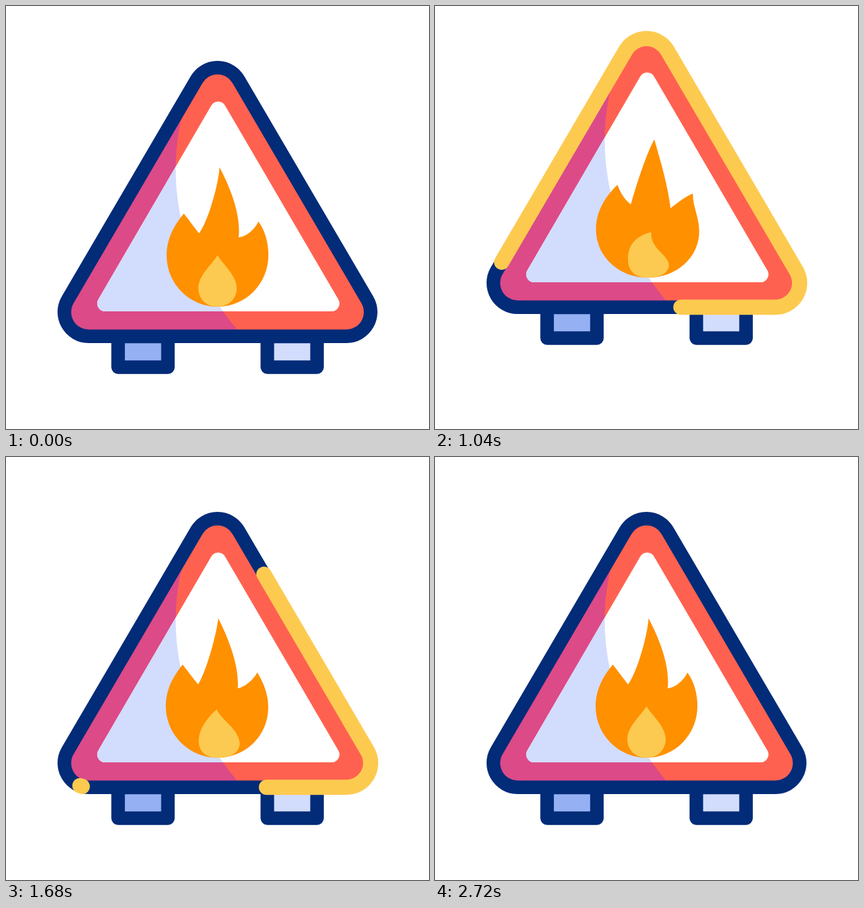
Animation, 640 px wide and 640 px high, one loop 2800 ms. Source, as an HTML page:

```html
<!DOCTYPE html>
<html lang="en">
<head>
<meta charset="utf-8">
<title>Fire warning sign</title>
<style>
  html, body { margin: 0; width: 100%; height: 100%; overflow: hidden; background: #fff; }
  svg { display: block; width: 100%; height: 100%; }
  .leg { stroke: #022b78; stroke-width: 20.5; stroke-linejoin: round; }
  .border { fill: none; stroke: #022b78; stroke-width: 20.6; }
  .glow { fill: none; stroke: #fdca50; stroke-width: 23; stroke-linecap: round; }
</style>
</head>
<body>
<svg viewBox="0 0 640 640">
  <defs>
    <clipPath id="frameClip"><path class="frame"/></clipPath>
    <clipPath id="panelClip"><path class="panel"/></clipPath>
  </defs>
  <g id="sign">
    <path class="leg" fill="#95b0f3" d="M169.6 500H245V546.6H169.6Z"/>
    <path class="leg" fill="#d2dcfd" d="M395.4 500H470.6V546.6H395.4Z"/>
    <path class="frame" fill="#ff6150"/>
    <path class="shade" fill="#dc4a87" clip-path="url(#frameClip)"/>
    <path class="panel" fill="#fff"/>
    <path class="shade" fill="#d2dcfd" clip-path="url(#panelClip)"/>
    <path class="frame border"/>
    <path class="frame glow"/>
    <path class="frame glow"/>
    <path class="frame glow"/>
    <path id="flame" fill="#ff9000"/>
    <path id="core" fill="#fcca50"/>
  </g>
</svg>
<script>
const LOOP = 2800, STEP = 40;
const $$ = s => [...document.querySelectorAll(s)];
const [sign, flame, core] = ['#sign', '#flame', '#core'].map(s => $$(s)[0]);
const glows = $$('.glow');

// Rounded triangle from its corner centres, starting on the bottom edge.
function triangle(points, r) {
  const edges = points.map((p, i) => {
    const q = points[(i + 1) % 3];
    const dx = q[0] - p[0], dy = q[1] - p[1], k = r / Math.hypot(dx, dy);
    return [p, q].map(c => `${c[0] - dy * k} ${c[1] + dx * k}`);
  });
  return edges.map(([a, b], i) =>
    `${i ? '' : 'M' + a}L${b}A${r} ${r} 0 0 0 ${edges[(i + 1) % 3][0]}`).join('') + 'Z';
}

// Smooth monotone curve through [time, value] keys.
function track(...keys) {
  const slope = keys.slice(1).map(([t, v], i) => (v - keys[i][1]) / (t - keys[i][0]));
  const tangent = keys.map((_, i) => {
    const a = slope[i - 1], b = slope[i];
    return a * b > 0 ? 2 * a * b / (a + b) : 0;
  });
  return t => {
    if (t <= keys[0][0]) return keys[0][1];
    const i = keys.findIndex(k => t < k[0]) - 1;
    if (i < 0) return keys[keys.length - 1][1];
    const [t0, v0] = keys[i], [t1, v1] = keys[i + 1];
    const h = t1 - t0, u = (t - t0) / h, w = 1 - u;
    return v0 * w * w * (1 + 2 * u) + v1 * u * u * (3 - 2 * u)
      + h * u * w * (tangent[i] * w - tangent[i + 1] * u);
  };
}

// Blend two path strings that share a structure.
function blend(a, b, k) {
  const to = b.match(/[\d.]+/g);
  let i = 0;
  return a.replace(/[\d.]+/g, n => (+n + (to[i++] - n) * k).toFixed(2));
}

const upright = 'M323 244C322 268 306 326 292 344C284 334 277 324 269 314C256 330 243 350 243 377C243 420 277 455 320 455C363 455 397 420 397 377C397 358 392 340 382 326C376 339 363 349 352 350C356 315 338 272 323 244Z';
const left = 'M304 244C288 270 279 305 279 335C279 335 262 326 251 314C242 332 231 345 231 374C231 417 270 455 320 455C365 455 395 428 395 394C395 364 368 350 363 326C353 329 345 338 339 351C327 315 315 278 304 244Z'.replace('279 335C279 335', '279 345C268 337');
const right = 'M339 247C317 270 303 306 300 344C289 340 283 328 282 315C258 334 244 360 244 385C244 425 278 455 323 455C368 455 402 428 402 391C402 366 388 356 397 329C380 327 367 338 360 350C349 315 343 280 339 247Z';

const drop = 'M320 377C327 390 349 407 349 427C349 444 336 455 320 455C304 455 291 444 291 427C291 407 313 390 320 377Z';
const coreLeft = 'M306 383C324 387 354 405 355 430C354 446 340 455 320 455C303 455 293 446 293 432C293 420 302 403 306 383Z';
const corePoses = [
  drop,
  'M319 378C328 390 349 407 349 427C347 446 334 455 320 455C304 455 293 444 293 428C293 410 309 392 319 378Z',
  'M346 385C355 396 358 408 357 424C355 443 345 455 322 455C305 455 294 445 294 429C294 411 327 411 346 385Z',
  'M327 386C326 413 354 420 354 437C352 450 338 455 322 455C304 455 292 446 292 427C292 404 305 392 327 386Z',
  coreLeft,
  'M333 381C329 411 352 421 352 438C351 450 340 455 322 455C302 455 290 446 290 428C290 403 308 384 333 381Z',
  coreLeft,
  drop
];

const lift = track([200, 0], [725, -44], [1035, -44], [1560, 0]);
const lean = track([120, 0], [560, -1], [880, 1], [1400, -1], [2000, 1], [2380, -1], [2720, 0]);
const corePhase = track([120, 0], [360, 1], [720, 2], [1040, 3], [1400, 4], [2000, 5], [2360, 6], [2720, 7]);

// Tail and head of each light running round the border, as path lengths.
const START = -10, END = 1382;
const runs = [
  [track([360, START], [720, 88], [1040, 247], [1400, 923], [1700, END]),
   track([240, START], [360, 25], [720, 518], [1040, 1300], [1150, END])],
  [track([1400, START], [1700, 300], [2000, 1234], [2080, END]),
   track([1120, START], [1400, 231], [2000, 1361], [2040, END])],
  [track([1800, START], [2000, 395], [2310, END]),
   track([1770, START], [2000, 441], [2300, END])]
];

const setPath = (sel, d) => $$(sel).forEach(el => el.setAttribute('d', d));
setPath('.frame', triangle([[125, 463], [515, 463], [320, 130]], 36.7));
setPath('.panel', triangle([[150, 450], [492.5, 450], [321, 156.5]], 12));
setPath('.shade', 'M268 160C242 260 258 380 350 490V520H60V160Z');
const total = glows[0].getTotalLength();

function draw(t) {
  sign.setAttribute('transform', `translate(0 ${lift(t).toFixed(2)})`);

  const s = lean(t);
  flame.setAttribute('d', blend(upright, s < 0 ? left : right, Math.abs(s)));

  const p = corePhase(t), i = Math.min(Math.floor(p), corePoses.length - 2);
  core.setAttribute('d', blend(corePoses[i], corePoses[i + 1], p - i));

  runs.forEach(([tail, head], n) => {
    const from = tail(t), length = head(t) - from, style = glows[n].style;
    style.display = length > 0.5 ? '' : 'none';
    style.strokeDasharray = `${length} ${total - length}`;
    style.strokeDashoffset = -from;
  });
}

const began = performance.now();
function tick() {
  const t = (performance.now() - began) % LOOP;
  draw(Math.floor(t / STEP) * STEP);
  requestAnimationFrame(tick);
}
tick();
</script>
</body>
</html>
```
